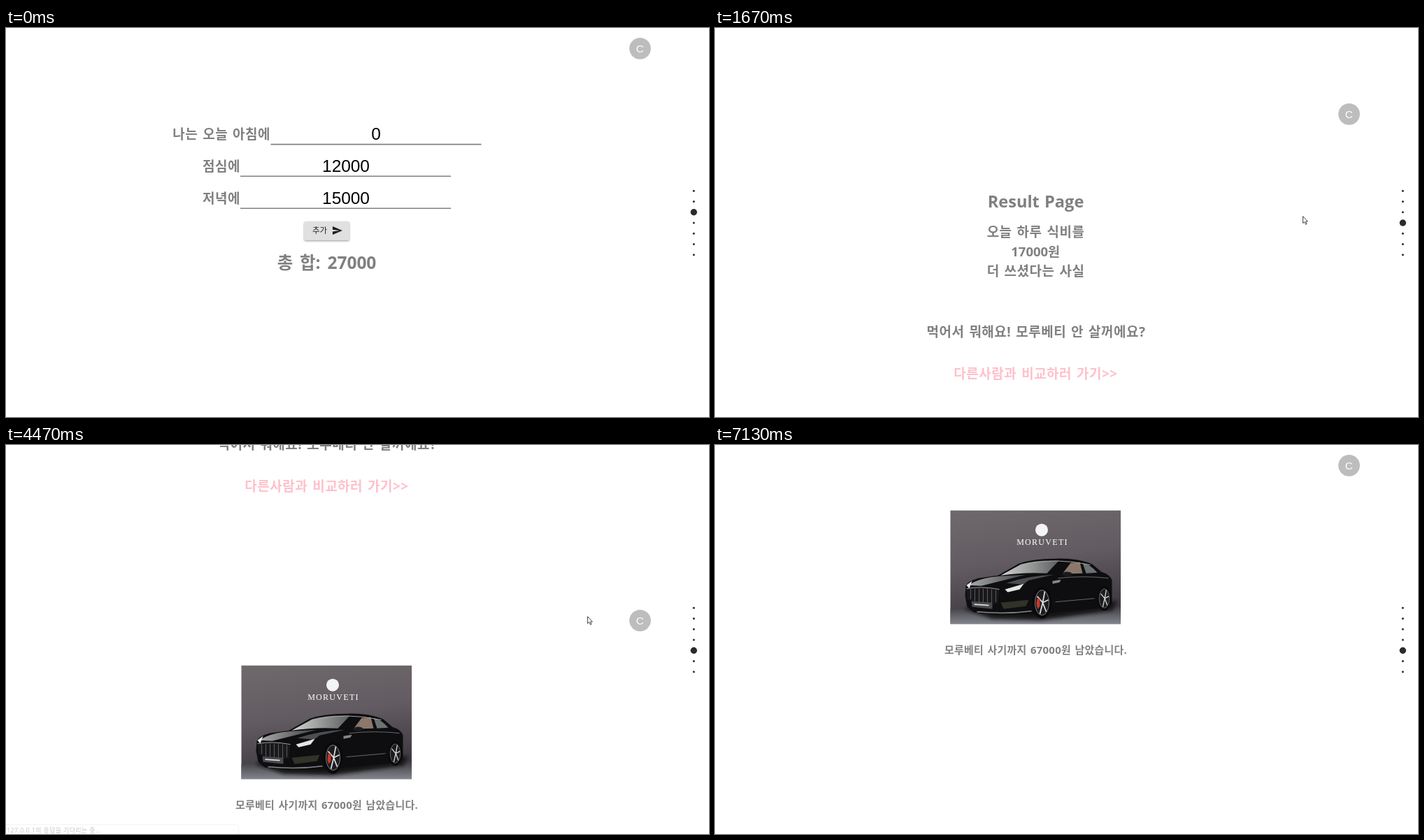
An HTML page that plays this animation: 1005x557 px, repeating every 7.19 s.

```html
<!DOCTYPE html>
<html lang="ko">
<head>
<meta charset="utf-8">
<title>Result Page</title>
<style>
html, body { margin: 0; width: 100%; height: 100%; overflow: hidden; background: #fff; }
svg { display: block; width: 100%; height: 100%; }
text { font-family: "Open Sans", "Noto Sans CJK KR", "Noto Sans CJK", sans-serif; white-space: pre; }
.label, .line, .caption, .big, .title { fill: #808080; font-weight: 700; text-anchor: middle; }
.label, .line { font-size: 19px; letter-spacing: .5px; word-spacing: 1.5px; }
.label { text-anchor: end; }
.num { font-size: 18.5px; letter-spacing: 0; }
.caption { font-size: 14.9px; letter-spacing: .3px; word-spacing: 1.3px; }
.big { font-size: 24.5px; word-spacing: 3.5px; }
.title { font-size: 23.6px; word-spacing: 1px; }
.link { fill: #ffc0cb; }
.value { font: 24.4px "Liberation Sans", Arial, sans-serif; text-anchor: middle; }
.avatar { font: 15.4px "Liberation Sans", Arial, sans-serif; fill: #fff; text-anchor: middle; }
.btn { font-size: 11.5px; fill: #222; }
.brand { font: 12px "Liberation Serif", serif; letter-spacing: 1.3px; fill: #fff; text-anchor: middle; }
.status { font-size: 9px; letter-spacing: .35px; fill: #5f6368; }
.rule { stroke: #808080; stroke-width: 1.6; }
</style>
</head>
<body>
<svg viewBox="0 0 1005 557">
  <defs>
    <linearGradient id="wall" x2=".2" y2="1">
      <stop offset="0" stop-color="#6f696d"/>
      <stop offset=".5" stop-color="#625b61"/>
      <stop offset="1" stop-color="#3d383f"/>
    </linearGradient>
    <linearGradient id="floor" x2="0" y2="1">
      <stop offset="0" stop-color="#3c3a41"/>
      <stop offset="1" stop-color="#83858c"/>
    </linearGradient>
    <linearGradient id="glass" x2="1">
      <stop offset="0" stop-color="#d3d6d2"/>
      <stop offset="1" stop-color="#5b5e5d"/>
    </linearGradient>
    <linearGradient id="hood" x2="1">
      <stop offset="0" stop-color="#a9abaa"/>
      <stop offset="1" stop-color="#3c3e40"/>
    </linearGradient>
    <filter id="lift" x="-20%" y="-30%" width="140%" height="180%">
      <feDropShadow dx="0" dy="1.4" stdDeviation="1.1" flood-opacity=".38"/>
    </filter>
    <filter id="soft" x="-10%" y="-30%" width="120%" height="160%">
      <feGaussianBlur stdDeviation="2.5"/>
    </filter>
    <g id="user">
      <circle cx="906.5" cy="29.3" r="15.4" fill="#bdbdbd"/>
      <text class="avatar" x="906.3" y="34.7">C</text>
    </g>
    <g id="wheel">
      <ellipse rx="14" ry="23" fill="#0a0a0b"/>
      <ellipse rx="10" ry="18" fill="#1c1c1f" stroke="#7f8084" stroke-width="1"/>
      <path d="M1 0 4-16M1 0 9-4M1 0 6 13M1 0-3 16M1 0-7-9" stroke="#dadadc" stroke-width="1.8"/>
    </g>
  </defs>

  <g class="page">
    <use href="#user"/>
    <text class="label" x="378" y="159.2">나는 오늘 아침에</text>
    <text class="label" x="335" y="205.3">점심에</text>
    <text class="label" x="335" y="251">저녁에</text>
    <path class="rule" d="M378.5 166.6H679.5M335 212.3H636M335 258.2H636"/>
    <text class="value" x="529" y="160.4">0</text>
    <text class="value" x="486" y="206.2">12000</text>
    <text class="value" x="486" y="251.6">15000</text>
    <rect x="426" y="276.8" width="65" height="27" rx="3" fill="#e0e0e0" filter="url(#lift)"/>
    <text class="btn" x="438" y="294">추가</text>
    <path transform="translate(465.6 282.1) scale(.665)" d="M2 21 23 12 2 3V10L17 12 2 14z" fill="#1e1e1e"/>
    <text class="big" x="458.5" y="344.8">총 합: 27000</text>
  </g>

  <g class="page">
    <use href="#user"/>
    <text class="title" x="458.5" y="163.2">Result Page</text>
    <text class="line" x="458.5" y="205.2">오늘 하루 식비를</text>
    <text class="line num" x="458.2" y="233.2">17000원</text>
    <text class="line" x="458.5" y="261.2">더 쓰셨다는 사실</text>
    <text class="line" x="459" y="347.5">먹어서 뭐해요! 모루베티 안 살꺼에요?</text>
    <text class="line link" x="458.5" y="407.5">다른사람과 비교하러 가기&gt;&gt;</text>
  </g>

  <g class="page">
    <use href="#user"/>
    <g transform="translate(336.5 93.7)">
      <path d="M0 0H243.5V162.5H0z" fill="url(#wall)"/>
      <path d="M0 141 243.5 137V162.5H0z" fill="url(#floor)"/>
      <circle cx="130.5" cy="28" r="9" fill="#f4f4f4"/>
      <text class="brand" x="131.5" y="49.5">MORUVETI</text>
      <path d="M20 141 60 126 238 130 232 143 130 157 60 155z" fill="#131216" filter="url(#soft)"/>
      <path d="M21 122 22 108Q25 101 40 97L68 93 98 76Q118 69 150 69 184 68 203 77L216 88Q228 91 231 100V134L212 140 146 147 118 149 66 149 34 146 24 138z" fill="#0e0e10"/>
      <path d="M72 93 101 77Q122 71 155 72L138 90Q106 88 72 93z" fill="url(#glass)"/>
      <path d="M26 107Q42 96 72 94L108 92 76 100 44 108z" fill="url(#hood)"/>
      <path d="M80 104Q112 93 148 92L112 100 104 106z" fill="#4b4d50"/>
      <path d="M160 91 172 75 185 74 189 90z" fill="#8b786a"/>
      <path d="M189 75Q200 77 210 89L194 90z" fill="#6b7472"/>
      <path d="M108 77Q150 67 200 78" fill="none" stroke="#a2a4a5"/>
      <path d="M154 97Q190 93 226 97M150 131 206 126" fill="none" stroke="#66686b"/>
      <path d="M146 101 158 99 156 103 146 105z" fill="#85878a"/>
      <path d="M78 113 105 105 99 113 82 117zM23 107 31 101 27 112z" fill="#e4e6e4"/>
      <path d="M23 112Q44 108 70 113L68 133Q40 135 24 127z" fill="#19191b"/>
      <path d="M29 113V127M35 112V130M41 112V132M47 112V133M53 112V133M59 113V133M65 114V131" stroke="#58595c"/>
      <path d="M23 112Q44 108 70 113" fill="none" stroke="#9d9e9f"/>
      <path d="M30 130 60 132V141L31 138z" fill="#4a4a4e"/>
      <path d="M34 134.5 55 136" stroke="#dedede" stroke-width="1.8"/>
      <path d="M72 132 112 128 108 137 76 141z" fill="#303328"/>
      <path d="M38 145Q78 149 116 144" fill="none" stroke="#85878a" stroke-width="1.4"/>
      <use href="#wheel" x="131" y="132"/>
      <path d="M125 125Q121 133 125 141L128 137V127z" fill="#c5392b"/>
      <use href="#wheel" transform="translate(220 126) scale(.72 .76)"/>
      <ellipse cx="167" cy="91" rx="7" ry="3.2" fill="#1b1b1d"/>
    </g>
    <text class="caption" x="458.5" y="299">모루베티 사기까지 67000원 남았습니다.</text>
  </g>

  <g id="dots" fill="#2b2b2b"></g>

  <g id="status">
    <path d="M-1 543.5H329Q332.5 543.5 332.5 547V558H-1z" fill="#fff" stroke="#e2e2e2"/>
    <text class="status" x="1" y="555">127.0.0.1의 응답을 기다리는 중...</text>
  </g>

  <path id="cursor" d="M.5.6V10.6L2.8 8.6 4.5 12.3 6 11.6 4.4 8H7.4z" fill="#fff" stroke="#333" stroke-width=".9"/>
</svg>

<script>
const LOOP = 7190, FPS = 15, PAGE = 564;
const SCROLLS = [1133, 4116], SCROLL_MS = 1000;

// time, x, y of the pointer tip
const POINTER = [
  [467, 964, 281], [533, 897, 263], [600, 876, 256], [1200, 876, 256],
  [1600, 840, 269], [2130, 840, 269], [2400, 858, 249], [2540, 858, 249],
  [2667, 831, 245], [6800, 831, 245], [6867, 840, 251], [6933, 872, 268],
  [7000, 924, 285], [7067, 985, 291]
];
// time, opacity of the loading message
const STATUS = [
  [800, 0], [930, 1], [1150, 1], [1400, 0],
  [4200, 0], [4320, 1], [4350, 1], [4530, 0]
];

const $ = id => document.getElementById(id);
const clamp = v => Math.min(1, Math.max(0, v));
const pages = [...document.querySelectorAll('.page')];
const pointer = $('cursor'), message = $('status');

const dots = Array.from({ length: 7 }, (_, i) => {
  const dot = document.createElementNS('http://www.w3.org/2000/svg', 'circle');
  dot.setAttribute('cx', 983.3);
  dot.setAttribute('cy', 233.2 + i * 15.27);
  return $('dots').appendChild(dot);
});

// cubic-bezier(.25, .1, .25, 1)
function ease(x) {
  if (x <= 0 || x >= 1) return clamp(x);
  const curve = (s, a, b) => 3 * (1 - s) ** 2 * s * a + 3 * (1 - s) * s * s * b + s ** 3;
  let lo = 0, hi = 1;
  for (let i = 0; i < 24; i++) {
    const mid = (lo + hi) / 2;
    if (curve(mid, .25, .25) < x) lo = mid; else hi = mid;
  }
  return curve(lo, .1, 1);
}

function track(keys, t) {
  if (t <= keys[0][0]) return keys[0].slice(1);
  const i = keys.findIndex(k => k[0] > t);
  if (i < 0) return keys[keys.length - 1].slice(1);
  const a = keys[i - 1], b = keys[i], f = (t - a[0]) / (b[0] - a[0]);
  return a.slice(1).map((v, j) => v + (b[j + 1] - v) * f);
}

function draw(ms) {
  const t = Math.floor((ms + 4) * FPS / 1000) * 1000 / FPS;

  const scroll = SCROLLS.reduce((sum, s) => sum + ease((t - s) / SCROLL_MS), 0);
  pages.forEach((page, i) =>
    page.setAttribute('transform', `translate(0 ${Math.round((i - scroll) * PAGE)})`));

  const active = 2 + SCROLLS.reduce((sum, s) => sum + clamp((t - s + 50) / 100), 0);
  dots.forEach((dot, i) =>
    dot.setAttribute('r', 1.5 + 3.2 * clamp(1 - Math.abs(i - active))));

  message.setAttribute('opacity', track(STATUS, t)[0]);

  const [x, y] = track(POINTER, t);
  pointer.setAttribute('transform', `translate(${Math.round(x)} ${Math.round(y)})`);
  pointer.setAttribute('visibility', t > 460 && t < 7100 ? 'visible' : 'hidden');
}

const start = performance.now();
function tick() {
  draw((performance.now() - start) % LOOP);
  requestAnimationFrame(tick);
}
tick();
</script>
</body>
</html>
```
